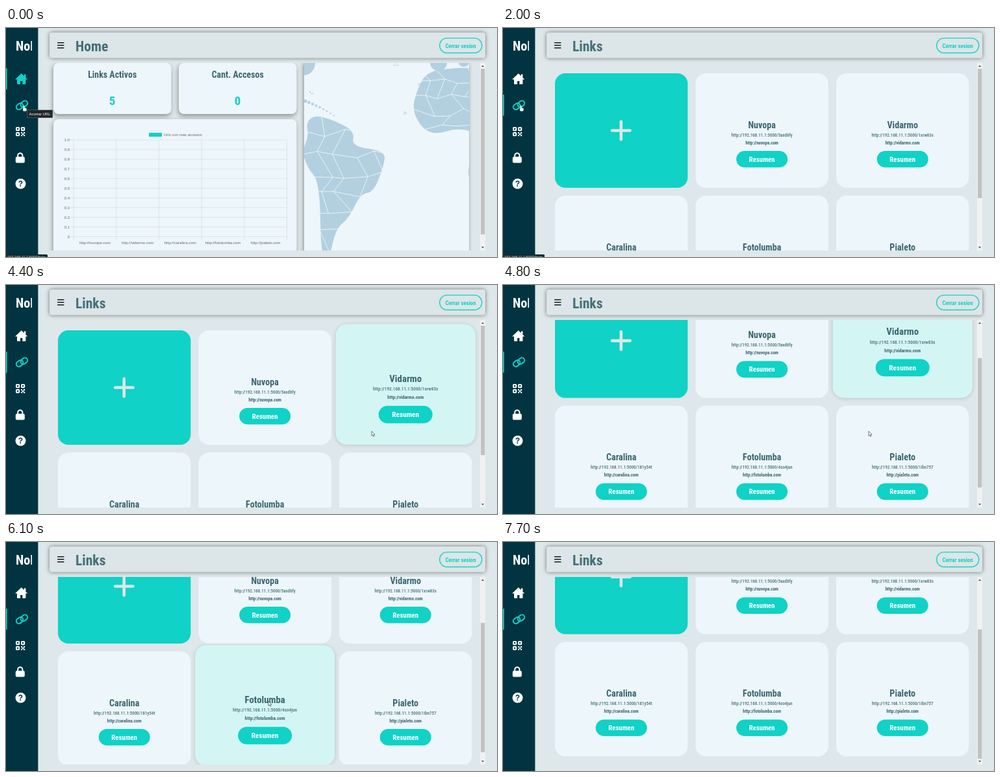
Write an HTML page with a canvas that moves like this. It is 756 px wide and 354 px high and loops after 8500 ms.

```html
<!DOCTYPE html>
<html lang="es">
<head>
<meta charset="utf-8">
<title>Links</title>
<style>
html, body { margin: 0; width: 100%; height: 100%; overflow: hidden; background: #dee7e9; }
canvas { display: block; width: 756px; height: 354px; }
</style>
</head>
<body>
<canvas id="stage"></canvas>
<script>
const W = 756, H = 354, LOOP = 8500, STEP = 100;
const BG = '#dee7e9', DARK = '#013440', TEAL = '#10d2c6', CARD = '#edf6fb', INK = '#3b666f';
const LAND = '#b3d0e0';
const NARROW = '"Roboto Condensed", "Liberation Sans Narrow", Roboto, sans-serif';
const PLAIN = '"Liberation Sans", Arial, sans-serif';

const canvas = document.getElementById('stage');
const ctx = canvas.getContext('2d');
const dpr = window.devicePixelRatio || 1;
canvas.width = W * dpr;
canvas.height = H * dpr;

function smooth(u) {
  u = Math.min(1, Math.max(0, u));
  return u * u * (3 - 2 * u);
}
function seeded(seed) {
  return () => (seed = (seed * 16807) % 2147483647) / 2147483647;
}

// Text: y is the middle of the capitals
const narrow = (size, weight = 700) => `${weight} condensed ${size}px ${NARROW}`;
ctx.font = narrow(14.2);
const typeScale = Math.min(1.15, Math.max(0.8, 75 / ctx.measureText('Links Activos').width));

function write(s, x, y, size, color, font, align) {
  ctx.font = font;
  ctx.textAlign = align;
  ctx.fillStyle = color;
  ctx.fillText(s, x, y + size * 0.357);
}
function label(s, x, y, size, color = INK, align = 'center', weight = 700) {
  size *= typeScale;
  write(s, x, y, size, color, narrow(size, weight), align);
}
function small(s, x, y, align = 'center', size = 6, color = '#666') {
  write(s, x, y, size, color, `${size}px ${PLAIN}`, align);
}

// Shapes
function rect(x, y, w, h, color) {
  ctx.fillStyle = color;
  ctx.fillRect(x, y, w, h);
}
function pill(x, y, w, h, r) {
  ctx.beginPath();
  ctx.roundRect(x, y, w, h, r);
}
function round(x, y, w, h, r, color) {
  pill(x, y, w, h, r);
  ctx.fillStyle = color;
  ctx.fill();
}
function ring(x, y, w, h, r, color, width) {
  pill(x, y, w, h, r);
  ctx.strokeStyle = color;
  ctx.lineWidth = width;
  ctx.stroke();
}
function disc(x, y, r, color) {
  ctx.beginPath();
  ctx.arc(x, y, r, 0, 7);
  ctx.fillStyle = color;
  ctx.fill();
}
function poly(points, color) {
  ctx.beginPath();
  points.forEach(p => ctx.lineTo(...p));
  ctx.closePath();
  ctx.fillStyle = color;
  ctx.fill();
}
function line(x1, y1, x2, y2, color, width) {
  ctx.beginPath();
  ctx.moveTo(x1, y1);
  ctx.lineTo(x2, y2);
  ctx.strokeStyle = color;
  ctx.lineWidth = width;
  ctx.stroke();
}
function saved(draw) {
  ctx.save();
  draw();
  ctx.restore();
}
function shadow(color, blur, x, y, draw) {
  saved(() => {
    ctx.shadowColor = color;
    ctx.shadowBlur = blur * dpr;
    ctx.shadowOffsetX = x * dpr;
    ctx.shadowOffsetY = y * dpr;
    draw();
  });
}
function clipped(x, y, w, h, draw) {
  saved(() => {
    ctx.beginPath();
    ctx.rect(x, y, w, h);
    ctx.clip();
    draw();
  });
}

// Sidebar
function homeIcon(c) {
  poly([[14, 79.4], [23.7, 70.3], [33.3, 79.4]], c);
  rect(27.8, 71.5, 2.6, 5, c);
  round(17, 78, 13.4, 9, 1, c);
  rect(22, 82, 3.4, 5, DARK);
}
function linkIcon(c) {
  for (const side of [-1, 1]) saved(() => {
    ctx.translate(24.5 + side * 3.4, 119.3 - side * 1.9);
    ctx.rotate(-0.65);
    ring(-5.6, -4, 11.2, 8, 4, c, 2);
  });
}
function tilesIcon() {
  for (const [x, y] of [[16, 154], [24, 154], [16, 162]]) ring(x, y, 4.2, 4.2, 0.6, '#fff', 2);
  for (let i = 0; i < 9; i += 2) rect(23 + (i % 3) * 2, 161 + Math.floor(i / 3) * 2, 2.2, 2.2, '#fff');
}
function lockIcon() {
  round(14.8, 199, 14, 9.5, 2, '#fff');
  ring(18.2, 193.5, 7.2, 9, 3.6, '#fff', 2);
}
function sidebar(onLinks) {
  rect(0, 0, 49.4, H, DARK);
  clipped(0, 0, 40, 60, () => label('Nol', 15, 27.5, 20.5, '#fff', 'left'));
  rect(0, onLinks ? 103 : 62.5, 1.6, 32.5, TEAL);
  homeIcon(onLinks ? '#fff' : TEAL);
  linkIcon(TEAL);
  tilesIcon();
  lockIcon();
  disc(22.5, 240.8, 8, '#fff');
  write('?', 22.5, 240.8, 12, DARK, `bold 12px ${PLAIN}`, 'center');
}

function header(title) {
  shadow('rgba(0,0,0,.5)', 6, 0, 0, () => round(67, 7, 671, 39.5, 4, '#dce5e7'));
  for (const y of [22, 26, 30]) round(79, y, 10.5, 1.5, 0.6, '#15191b');
  label(title, 107, 28, 22, '#456f78', 'left');
  ring(667.7, 15.6, 65, 22.9, 11.4, TEAL, 1.4);
  label('Cerrar sesion', 700, 27.5, 9, TEAL);
}

function scrollbar(top, height) {
  rect(730, 54, 8, 290, '#f1f1f1');
  rect(731, top, 6.3, height, '#c1c1c1');
  for (const [y, d] of [[60, -2.4], [338, 2.4]]) poly([[732, y], [736, y], [734, y + d]], '#505050');
}

// Home page
const SITES = [
  ['Nuvopa', '5axd6fy'], ['Vidarmo', '1xrw83s'], ['Caralina', '181y54t'],
  ['Fotolumba', '4so4jun'], ['Pialeto', '1ibn757']
].map(([name, code]) => ({
  name, url: `http://${name.toLowerCase()}.com`, brief: `http://192.168.11.1:5000/${code}`
}));

// Closed curve that rounds off the given corners
function blob(points) {
  const path = new Path2D(), n = points.length;
  const mid = i => {
    const a = points[i % n], b = points[(i + 1) % n];
    return [(a[0] + b[0]) / 2, (a[1] + b[1]) / 2];
  };
  path.moveTo(...mid(0));
  for (let i = 1; i <= n; i++) path.quadraticCurveTo(...points[i % n], ...mid(i));
  path.closePath();
  return path;
}
const SOUTH = blob([[456, 190], [466, 168], [462, 146], [476, 134], [508, 144], [537, 160], [532, 183],
  [584, 190], [582, 212], [566, 254], [546, 256], [528, 294], [508, 310], [498, 356], [485, 356],
  [483, 238], [464, 216]]);
const AFRICA = blob([[650, 66], [700, 61], [750, 62], [750, 176], [702, 152], [652, 168], [624, 130],
  [634, 92]]);
const COASTS = [[459, 54, 17, 19], [666, 54, 13, 12], [705, 54, 8, 6], [714, 222, 2, 10]];
const ISLANDS = [[601, 58], [638, 87], [615, 132], [472, 100]];

function country(land, x, y, w, h, size, seed) {
  const rnd = seeded(seed), cols = Math.ceil(w / size), rows = Math.ceil(h / size);
  const nodes = Array.from({ length: rows + 1 }, (_, r) => Array.from({ length: cols + 1 }, (_, c) => [
    x + (c + (r % 2) / 2 + (rnd() - 0.5) * 0.6) * size, y + (r + (rnd() - 0.5) * 0.6) * size
  ]));
  ctx.fillStyle = LAND;
  ctx.fill(land);
  saved(() => {
    ctx.clip(land);
    for (let r = 0; r < rows; r++) for (let c = 0; c < cols; c++) {
      line(...nodes[r][c], ...nodes[r][c + 1], CARD, 0.9);
      if (rnd() < 0.7) line(...nodes[r][c], ...nodes[r + 1][c], CARD, 0.9);
    }
  });
}
function map() {
  shadow('rgba(0,0,0,.4)', 6, -1, 1, () => rect(459, 54, 254, 300, CARD));
  clipped(459, 54, 254, 290, () => {
    const rnd = seeded(11);
    country(SOUTH, 450, 135, 140, 220, 30, 5);
    country(AFRICA, 620, 62, 100, 110, 23, 8);
    ctx.fillStyle = LAND;
    for (const [x, y, rx, ry] of COASTS) {
      ctx.beginPath();
      ctx.ellipse(x, y, rx, ry, 0, 0, 7);
      ctx.fill();
    }
    for (let i = 0; i < 9; i++) disc(461 + i * 5.5, 113 + i * i * 0.1 + i * 2, 2.6 - i * 0.2, LAND);
    for (const [x, y] of ISLANDS)
      for (let i = 0; i < 4; i++) disc(x + rnd() * 8 - 4, y + rnd() * 5 - 2.5, 0.9, LAND);
  });
}

function chart() {
  const left = 104, top = 173, col = 65.7, row = 14.95, grid = '#d5dde1';
  rect(220, 162, 20, 6, TEAL);
  small('Urls con mas accesos', 243, 164.8, 'left');
  for (let i = 0; i <= 10; i++) {
    const y = top + i * row;
    line(left - 5, y, left + 5 * col, y, grid, 0.7);
    small(i === 10 ? '0' : (1 - i / 10).toFixed(1), 98, y, 'right');
  }
  for (let i = 0; i <= 5; i++) line(left + i * col, top, left + i * col, top + 10 * row + 5, grid, 0.7);
  SITES.forEach((s, i) => small(s.url, left + (i + 0.5) * col, 332));
}

function panel(x, y, w, h) {
  shadow('rgba(0,0,0,.38)', 7, -1, 3, () => round(x, y, w, h, 8, CARD));
}
function homePage() {
  clipped(56, 54, 682, 290, () => {
    [['Links Activos', '5', 73], ['Cant. Accesos', '0', 266]].forEach(([name, value, x]) => {
      panel(x, 54, 181.5, 79);
      label(name, x + 90.7, 72.5, 14.2);
      label(value, x + 90.7, 112.5, 19.5, TEAL);
    });
    panel(73, 141, 374.5, 230);
    chart();
    map();
    scrollbar(63, 256);
  });
}

// Links page
const CARD_W = 204.4, CARD_H = 177;
// [time, card under the pointer]
const HOVERS = [[2900, 0], [3700, 1], [4950, 4], [5350, 3], [6900, 0], [7150, -1]];
// [start, duration, distance]
const WHEEL = [[4500, 475, 104.5], [5550, 250, -52], [5950, 230, 52]];

function hoverOf(card, t) {
  const fade = i => i < HOVERS.length ? smooth((t - HOVERS[i][0]) / 200) : 0;
  return HOVERS.reduce((v, [, c], i) => c === card ? Math.max(v, fade(i) - fade(i + 1)) : v, 0);
}
function place(slot) {
  return [80 + (slot % 3) * 216.5, 70 + Math.floor(slot / 3) * 189];
}
function addCard() {
  const [x, y] = place(0), cx = x + 101.8, cy = y + 88.5;
  round(x, y, CARD_W, CARD_H, 16, TEAL);
  round(cx - 16, cy - 2.3, 32, 4.6, 2, BG);
  round(cx - 2.3, cy - 16, 4.6, 32, 2, BG);
}
function linkCard(site, slot, hover) {
  const [x, y] = place(slot);
  const mid = x + CARD_W / 2, zoom = 1 + 0.05 * hover;
  saved(() => {
    ctx.translate(mid, y + CARD_H / 2 - 4.8 * hover);
    ctx.scale(zoom, zoom);
    ctx.translate(-mid, -y - CARD_H / 2);
    shadow(`rgba(0,40,50,${0.18 * hover})`, 6, 0, 1, () => round(x, y, CARD_W, CARD_H, 16, CARD));
    round(x, y, CARD_W, CARD_H, 16, `rgba(211,246,245,${hover})`);
    label(site.name, mid, y + 79.5, 14.4);
    label(site.brief, mid, y + 95.3, 7.1, '#4c747c', 'center', 500);
    label(site.url, mid, y + 107.2, 7.1);
    round(mid - 39.5, y + 120, 79, 25.6, 12.8, TEAL);
    label('Resumen', mid, y + 133, 11, '#fff');
  });
}
function linksPage(t) {
  const scroll = WHEEL.reduce((sum, [at, time, far]) => sum + far * smooth((t - at) / time), 0);
  clipped(56, 54, 682, 290, () => {
    saved(() => {
      ctx.translate(0, -scroll);
      addCard();
      SITES.map((site, i) => ({ site, slot: i + 1, hover: hoverOf(i, t) }))
        .sort((a, b) => a.hover - b.hover)
        .forEach(c => linkCard(c.site, c.slot, c.hover));
    });
    scrollbar(63 + scroll * 0.69, 200);
  });
}

// Pointer and browser hints: [time, x, y], resting where a place repeats
const PATH = [
  [2300, 26, 119], [3250, 470, 148], [3600, 489, 143], [4300, 563, 226], [4980, 563, 226],
  [5450, 404, 246], [6550, 404, 246], [7600, 700, -14]
];
function pointerAt(t) {
  const next = Math.max(1, PATH.findIndex(k => k[0] > t));
  const [a, b] = [PATH[next - 1], PATH[next]];
  const u = smooth((t - a[0]) / (b[0] - a[0]));
  return [a[1] + (b[1] - a[1]) * u, a[2] + (b[2] - a[2]) * u];
}
function pointer(t) {
  if (t >= 7600) return;
  saved(() => {
    ctx.translate(...pointerAt(t));
    if (t < 2400) {
      round(0.8, 0.8, 1.6, 6, 0.8, '#fff');
      round(0, 4.4, 5.6, 5, 1.5, '#fff');
      return;
    }
    poly([[0, 0], [0, 7.2], [1.7, 5.7], [2.8, 8.2], [3.9, 7.7], [2.8, 5.3], [5, 5.2]], '#fff');
    ctx.strokeStyle = '#222';
    ctx.lineWidth = 0.6;
    ctx.stroke();
  });
}
function statusBar(t) {
  const fadeOut = 1 - smooth((t - 1300) / 350);
  const alpha = t < 1800 ? fadeOut : t < 2500 ? 1 : 0;
  saved(() => {
    ctx.globalAlpha = alpha;
    round(-2, 350, 66, 8, 1.5, '#11292f');
    small('192.168.11.1:5000/links', 2, 354.3, 'left', 5.6, '#d5dcde');
  });
}
function tooltip() {
  rect(32, 126.5, 40, 12.5, '#6b7376');
  rect(32.5, 127, 39, 11.5, '#22272a');
  small('Acortar URL', 52, 132.7, 'center', 6, '#fff');
}

function draw(t) {
  const onLinks = t >= 1600;
  ctx.setTransform(dpr, 0, 0, dpr, 0, 0);
  rect(0, 0, W, H, BG);
  sidebar(onLinks);
  if (onLinks) linksPage(t);
  else homePage();
  header(onLinks ? 'Links' : 'Home');
  statusBar(t);
  if (t < 800) tooltip();
  pointer(t);
}

const start = performance.now();
function tick() {
  const t = (performance.now() - start) % LOOP;
  draw(Math.floor(t / STEP) * STEP);
  requestAnimationFrame(tick);
}
tick();
</script>
</body>
</html>
```
